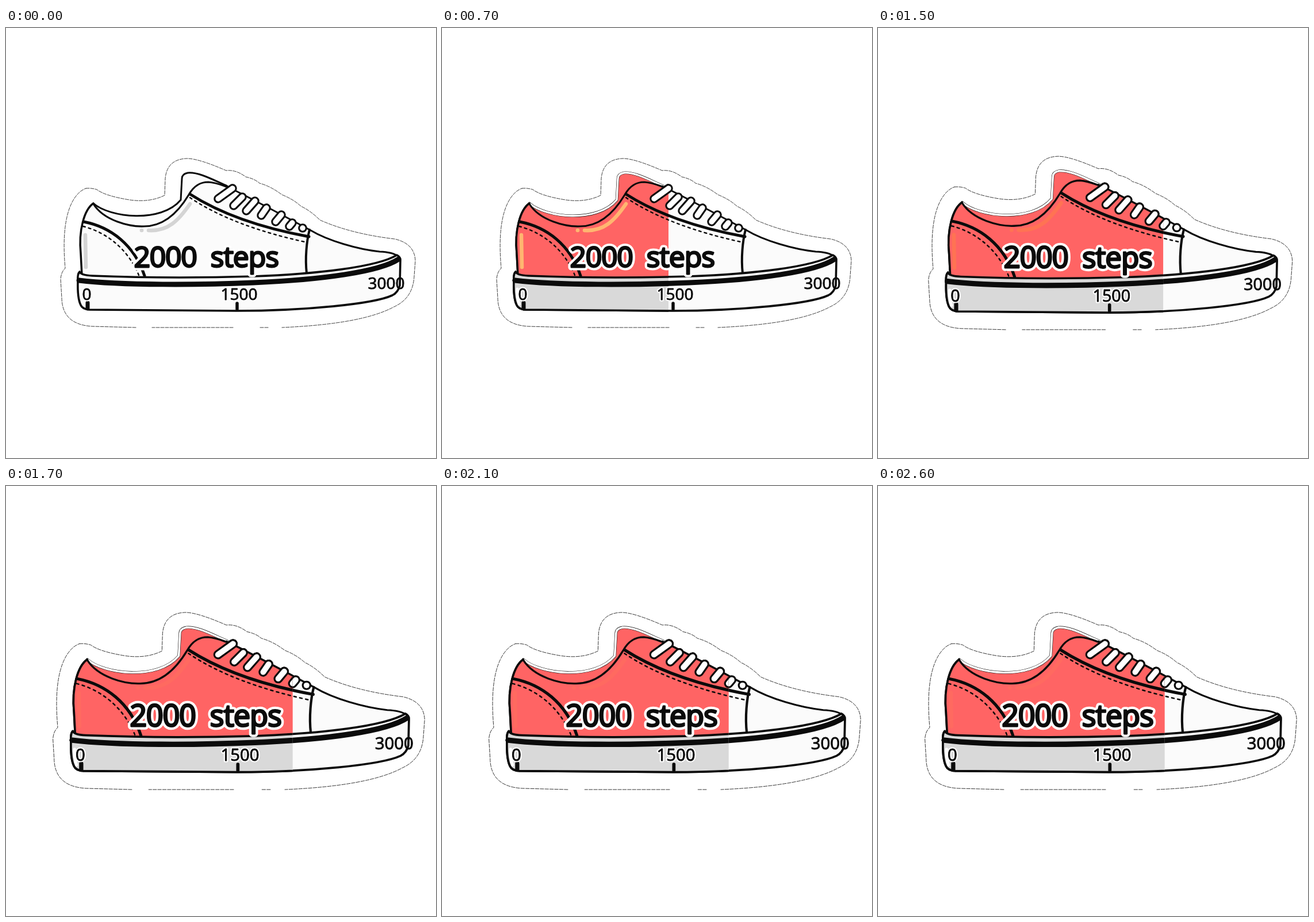
Animation of 748x748 px, one loop 2.7 s. Source, as an HTML page with a canvas:

```html
<!DOCTYPE html>
<html lang="en">
<head>
<meta charset="utf-8">
<title>Step counter shoe</title>
<style>
  html, body { margin: 0; width: 100%; height: 100%; overflow: hidden; background: #fff; }
  canvas { display: block; width: 100vw; height: 100vh; }
</style>
</head>
<body>
<canvas id="stage" width="748" height="748"></canvas>
<script>
const ctx = document.getElementById('stage').getContext('2d');
const SIZE = 748, MID = SIZE / 2, LOOP = 2700, STEP = 100;
const INK = '#0b0b0b', PAPER = '#fbfbfb', RED = '#ff6464', GREY = '#d4d4d4';
const FONT = '"Open Sans", "Noto Sans", sans-serif';

const path = d => new Path2D(d);

const border = path(`M139 279 Q148 278 158 281 Q172 292 215 299 Q250 304 276 291
  L277 262 Q280 228 315 227 Q335 227 383 248 Q400 246 417 259 Q432 262 441 270
  Q460 275 480 290 Q500 298 513 310 Q530 318 546 334 Q600 358 676 367
  Q711 375 712 405 L710 432 Q708 470 675 485 Q620 515 480 521
  M456 521 H442 M395 521 H254 M226 521 L150 519 Q98 516 97 470
  L95 437 Q96 424 103 418 Q96 340 115 303 Q125 284 139 279`);

const upper = path(`M152 305 C136 316 126 352 130 392 L132 431
  C250 435 330 435 430 432 C540 428 645 416 680 396 Q672 390 650 389
  C612 385 560 370 530 352 C480 325 430 298 383 275 C360 264 335 250 316 252
  Q306 254 306 262 L304 299 C270 340 180 330 152 305Z`);

const sole = path(`M128 424 Q130 430 150 431 C250 435 330 435 430 432
  C540 428 645 416 680 395 Q686 398 686 404 L685 448 Q682 460 672 465
  C640 480 520 492 400 492 L145 490 Q133 489 130 482 Q124 470 125 440
  Q124 428 128 424Z`);

const backCollar = path(`M152 305 C180 330 270 340 304 299
  L306 262 Q306 254 316 252 C335 250 360 264 385 275`);
const frontCollar = path(`M152 306 C170 335 215 346 240 345 C275 345 300 320 318 290
  C328 272 340 268 352 268 C365 269 372 272 383 276`);
const heel = path('M152 305 C136 316 126 352 130 392 L132 430');
const topEdge = path('M383 275 C430 298 480 325 530 352 C560 370 612 385 650 389 Q672 390 680 396');
const vampSeam = path('M528 351 C523 370 520 400 523 427');
const eyestay = path('M320 289 C370 321 440 347 527 363');
const eyestayStitch = path('M320 295 C370 329 440 355 524 373');
const heelPatch = path('M135 337 C182 346 223 377 241 431');
const heelStitch = path('M134 345 C174 355 212 384 231 430');
const stripe = path('M127 439 C200 448 340 447 430 443 C550 438 650 424 683 402');
const shine = path('M138 360 L139 416 M235.9 352 H236.1 M248 352 C282 354 300 335 320 306');

const laces = [
  [369, 297, 394, 279], [396, 309, 411, 294], [418, 318, 433, 301], [444, 326, 453, 313],
  [469, 337, 479, 325], [493, 345, 498, 339], [515.9, 348, 516.1, 348]
];

// Time keys: [ms, r, g, b] and [ms, scale]
const shineKeys = [[0, 255, 200, 145], [700, 255, 182, 112], [1100, 255, 145, 72],
  [1500, 255, 115, 83], [1700, 255, 106, 96]];
const zoomKeys = [[1450, 1], [1500, 1.026], [1600, 1.068], [1700, 1.048]];

function keyed(keys, t) {
  const next = keys.findIndex(k => k[0] > t);
  if (next === 0) return keys[0].slice(1);
  if (next < 0) return keys[keys.length - 1].slice(1);
  const a = keys[next - 1], b = keys[next], f = (t - a[0]) / (b[0] - a[0]);
  return a.slice(1).map((v, i) => v + (b[i + 1] - v) * f);
}

function line(p, width, color = INK, dash = []) {
  ctx.lineWidth = width;
  ctx.strokeStyle = color;
  ctx.setLineDash(dash);
  ctx.stroke(p);
  ctx.setLineDash([]);
}

function fill(p, color) {
  ctx.fillStyle = color;
  ctx.fill(p);
}

function lettering(text, x, y, size, weight, spacing, halo) {
  ctx.font = `${size}px ${FONT}`;
  ctx.letterSpacing = spacing + 'px';
  if (halo) {
    ctx.lineWidth = halo;
    ctx.strokeStyle = '#fff';
    ctx.strokeText(text, x, y);
  }
  ctx.lineWidth = weight;
  ctx.strokeStyle = ctx.fillStyle = INK;
  ctx.strokeText(text, x, y);
  ctx.fillText(text, x, y);
}

function shoe(colored, shineColor) {
  fill(upper, colored ? RED : PAPER);
  line(shine, 6.5, shineColor);
  if (colored) {
    line(backCollar, 4.5);
    line(backCollar, 3.4, '#fff');
  } else {
    line(backCollar, 3);
  }
  line(topEdge, 3);
  line(frontCollar, 3.2);
  line(heel, 3.5);
  line(eyestay, 5);
  line(eyestayStitch, 2.4, INK, [4, 6]);
  line(heelPatch, 5);
  line(heelStitch, 2.4, INK, [4, 6]);
  line(vampSeam, 4);
  for (const [x1, y1, x2, y2] of laces) {
    const lace = path(`M${x1} ${y1} L${x2} ${y2}`);
    line(lace, 15.5);
    line(lace, 9.3, '#fff');
  }
  fill(sole, colored ? '#d9d9d9' : PAPER);
  if (colored) line(path('M131 454 Q131 472 134 480'), 5, '#fff');
  line(sole, 3.6);
  line(stripe, 9);
  line(path('M142 478 V488'), 7);
  line(path('M402 479 V489'), 5.5);
}

function labels() {
  lettering('2000', 222.5, 416, 50, 2.8, -1.3, 11);
  lettering('steps', 355.5, 416, 50, 2.8, -1.1, 11);
  lettering('0', 132.5, 473, 28, 0.9, 0, 5);
  lettering('1500', 373.5, 473, 28, 0.9, 0, 5);
  lettering('3000', 629.5, 454, 28, 0.9, 0, 0);
}

function draw(t) {
  const [zoom] = keyed(zoomKeys, t);
  const left = Math.max(0, 1 - t / 1450);
  const wipe = 493 - 370 * left * left;
  const rgb = keyed(shineKeys, t).map(Math.round);

  ctx.setTransform(1, 0, 0, 1, 0, 0);
  ctx.fillStyle = '#fff';
  ctx.fillRect(0, 0, SIZE, SIZE);
  ctx.translate(MID, MID);
  ctx.scale(zoom, zoom);
  ctx.translate(-MID, -MID);
  ctx.lineCap = ctx.lineJoin = 'round';

  line(border, 0.8, INK, [6, 2]);
  shoe(false, GREY);
  if (t > 0) {
    ctx.save();
    ctx.beginPath();
    ctx.rect(0, 0, wipe, SIZE);
    ctx.clip();
    shoe(true, `rgb(${rgb})`);
    ctx.restore();
  }
  labels();
}

const start = performance.now();
function tick() {
  const t = (performance.now() - start) % LOOP;
  draw(Math.floor(t / STEP) * STEP);
  requestAnimationFrame(tick);
}
tick();
</script>
</body>
</html>
```
